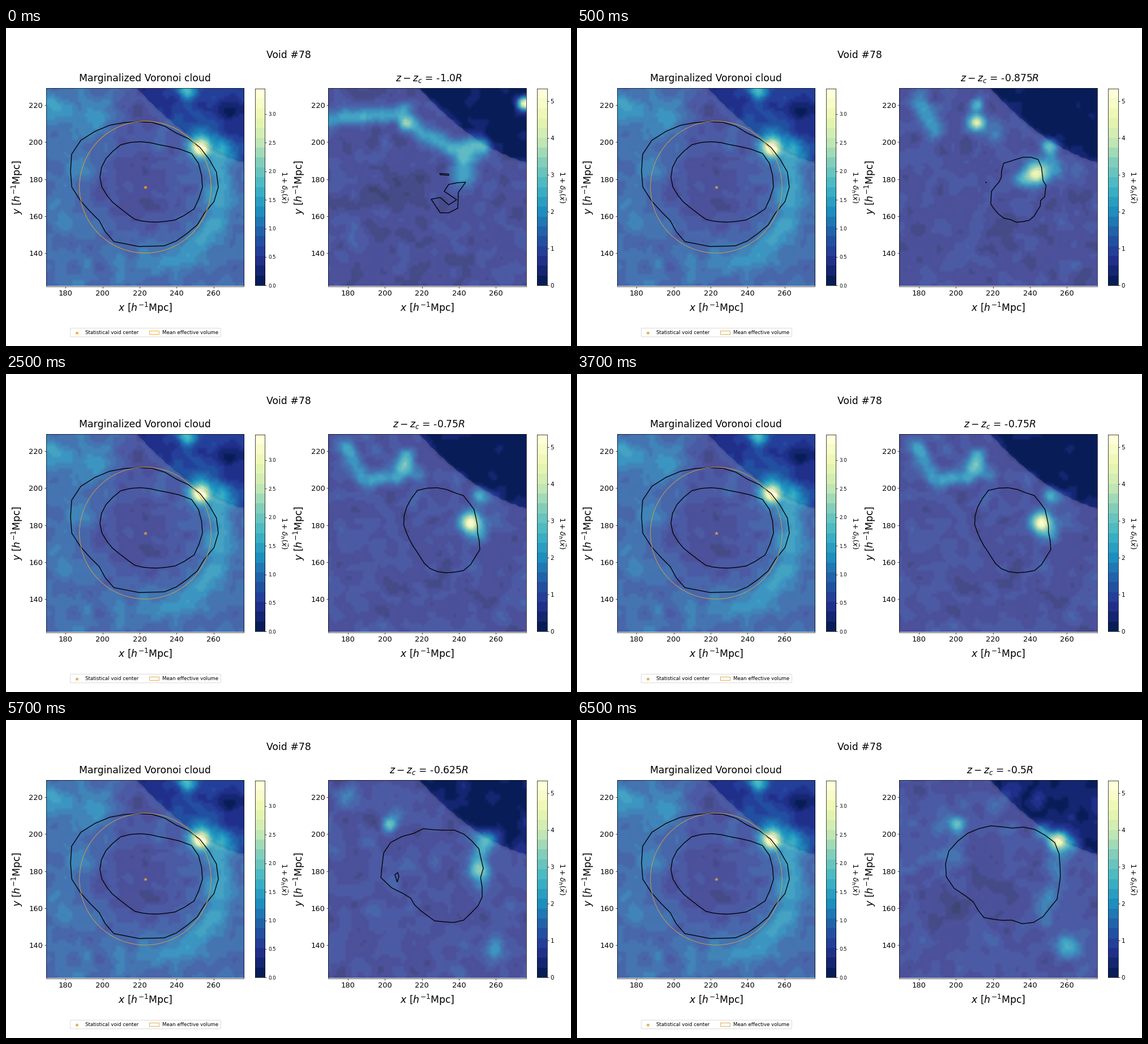
A matplotlib script for the animation above (8 s loop, 998 px wide and 561 px high).

```python
import numpy as np
import matplotlib.pyplot as plt
from matplotlib.animation import FuncAnimation
from matplotlib.patches import Circle, FancyBboxPatch, Polygon, Rectangle

W, H, DPI = 998, 561, 64          # all coordinates below are stage pixels
LEFT, TOP, SIZE, SHIFT = 71.0, 106.3, 349.2, 498.4
CENTER, RADIUS = (246, 280.7), 116.3
GRID = 68
CMAP = plt.get_cmap("YlGnBu_r", 20)
VEIL = np.array([0.84, 0.73, 0.80])
ORANGE, GOLD = "#fba414", "#d9a441"
plt.rcParams["font.family"] = "DejaVu Sans"

# Peaks are (x, y, height, spread); outlines are a center and radii every 30 degrees.
CLOUD_PEAKS = [(343, 213, .78, 12), (318, 111, .36, 11), (85, 145, .16, 18),
               (150, 150, .09, 25), (240, 150, -.13, 28), (385, 215, .18, 16),
               (412, 150, -.10, 25)]
CLOUD_OUTER = (CENTER, [129, 112, 110, 104, 110, 99, 130, 146, 125, 114, 109, 123])
CLOUD_INNER = (CENTER, [102, 91, 69, 62, 57, 60, 76, 86, 87, 77, 81, 105])

HOOK = [(782, 276), (797, 273), (812, 272), (799, 290), (798, 318), (782, 326), (767, 326),
        (751, 302), (767, 299), (782, 312), (796, 303), (774, 288)]

SLICES = [
    dict(depth="-1.0", base=.135, beyond=.03,
         ridge=[(575, 165), (600, 157), (695, 154), (735, 186), (785, 212), (840, 208)],
         crest=.30, width=11,
         peaks=[(706, 170, .26, 9), (706, 140, .14, 9), (807, 233, .36, 13),
                (836, 222, .16, 15), (806, 262, .30, 14), (915, 134, .90, 8),
                (690, 290, -.06, 40)],
         outline=None),
    dict(depth="-0.875", base=.135, beyond=.02,
         ridge=[(607, 125), (618, 155), (632, 185)], crest=.22, width=12,
         peaks=[(707, 169, .70, 10), (707, 137, .34, 8), (735, 190, .18, 14),
                (811, 259, .74, 14), (785, 270, .20, 10), (836, 210, .42, 10),
                (838, 240, .20, 13)],
         outline=((782, 288), [45, 41, 51, 55, 54, 56, 50, 38, 56, 57, 64, 47])),
    dict(depth="-0.75", base=.14, beyond=.02,
         ridge=[(604, 133), (632, 188), (690, 184), (708, 143)], crest=.27, width=10,
         peaks=[(709, 166, .25, 11), (730, 180, .15, 12), (820, 263, .78, 13),
                (836, 280, .18, 12), (838, 215, .32, 11)],
         outline=((770, 280), [64, 74, 76, 72, 62, 54, 62, 75, 87, 76, 74, 68])),
    dict(depth="-0.625", base=.145, beyond=.035,
         ridge=[(848, 214), (835, 240), (836, 295)], crest=.20, width=12,
         peaks=[(677, 186, .42, 9), (688, 168, .15, 11), (600, 135, .18, 14),
                (848, 214, .22, 13), (835, 264, .33, 13), (863, 405, .20, 13)],
         outline=((765, 278), [75, 84, 87, 78, 67, 61, 101, 108, 92, 84, 88, 85])),
    dict(depth="-0.5", base=.165, beyond=.06,
         ridge=[(850, 214), (850, 270), (836, 305), (822, 345)], crest=.14, width=12,
         peaks=[(672, 186, .40, 10), (661, 235, .13, 16), (849, 214, .60, 11),
                (825, 196, .22, 11), (872, 216, .24, 13), (868, 400, .24, 15),
                (745, 280, -.07, 50), (650, 340, -.09, 24)],
         outline=((760, 277), [92, 95, 93, 74, 81, 73, 108, 112, 98, 86, 97, 103]))]


def pt(px):
    return px * 72 / DPI


def survey_edge(u):
    """Height of the survey rim, u pixels right of where it meets the top."""
    return TOP + 1.107 * u - .00219 * u ** 2


def panel_grid(left):
    step = (np.arange(GRID) + .5) * SIZE / GRID
    return np.meshgrid(left + step, TOP + step)


def smooth_noise(seed, grain):
    freq = np.fft.fftfreq(GRID)
    kernel = np.exp(-2 * (np.pi * 1.5) ** 2 * (freq[:, None] ** 2 + freq ** 2))
    noise = np.random.default_rng(seed).normal(size=(GRID, GRID))
    noise = np.fft.ifft2(np.fft.fft2(noise) * kernel).real
    return noise * grain / noise.std()


def bump(distance, spread):
    return np.exp(-(distance / spread) ** 2 / 2)


def ridge_profile(x, y, points, width):
    t = np.linspace(0, len(points) - 1, 60)
    px, py = (np.interp(t, range(len(points)), axis) for axis in zip(*points))
    distance = np.hypot(x[..., None] - px, y[..., None] - py).min(axis=2)
    return bump(distance, width)


def void_profile(x, y):
    """Empty inside, with a wall that is densest toward the right."""
    dx, dy = x - CENTER[0], y - CENTER[1]
    r = np.hypot(dx, dy) / RADIUS
    wall = np.clip(dx / (r * RADIUS) + .3 * dy / (r * RADIUS), 0, 1)
    return .15 * wall * bump(r - 1.15, .13) - .125 * np.exp(-(r / .85) ** 4)


def density(x, y, left, base, beyond, peaks, seed, grain):
    depth = y - survey_edge(x - left - 161)
    inside = 1 / (1 + np.exp(-np.clip(depth / 3, -30, 30)))
    field = beyond + (base - beyond) * inside + smooth_noise(seed, grain)
    for px, py, height, spread in peaks:
        field += height * bump(np.hypot(x - px, y - py), spread)
    return field


def show_field(ax, x, y, field, left):
    """Plain field, with a veiled copy of it clipped to the survey region."""
    field = np.clip(field, 0, .999)
    color = CMAP(field)[..., :3]
    veiled = color + .27 * (1 - field[..., None]) * (VEIL - color)
    extent = (left, left + SIZE, TOP + SIZE, TOP)
    plain, veil = (ax.imshow(c, extent=extent, interpolation="bilinear", aspect="auto", zorder=z)
                   for z, c in enumerate((color, veiled)))
    u = np.linspace(-9, 200, 60)
    rim = np.column_stack([left + 161 + u, survey_edge(u) + .8 * np.sin(u * .4)])
    corners = [(left + SIZE + 9, TOP + SIZE), (left, TOP + SIZE), (left, TOP - 9)]
    veil.set_clip_path(Polygon(np.vstack([rim, corners]), transform=ax.transData))
    lines = [ax.plot(rim[:, 0] + k, rim[:, 1] - k, color="#1c2c60", lw=.5, alpha=.35, zorder=2)[0]
             for k in (-1.5, 0, 1.5)]
    rings = ax.contour(x, y, field, levels=[.55, .65, .75], colors="#506070",
                       linewidths=.4, alpha=.3, zorder=3)
    return [plain, veil, rings, *lines]


def outline(ax, points):
    return ax.add_patch(Polygon(points, fill=False, ec="black", lw=pt(1.35), zorder=5))


def ragged(center, radii, seed):
    """Closed ring through evenly spaced radii, roughened between them."""
    t = np.arange(0, 12, .4)
    r = np.interp(t, range(13), radii + radii[:1])
    r += np.random.default_rng(seed).uniform(-2, 2, t.size)
    angle = t * np.pi / 6
    return np.column_stack([center[0] + r * np.cos(angle), center[1] + r * np.sin(angle)])


def pixel_axes(x, y, w, h):
    return fig.add_axes([x / W, 1 - (y + h) / H, w / W, h / H])


def label(x, y, s, px, ha="center", va="center", **kw):
    return stage.text(x, y, s, fontsize=pt(px), ha=ha, va=va, **kw)


def style(ax, size):
    ax.tick_params(labelsize=pt(size), width=pt(.7), length=pt(3), pad=pt(3))
    for spine in ax.spines.values():
        spine.set_linewidth(pt(.7))
        spine.set_zorder(8)


def panel(left):
    ax = pixel_axes(left, TOP, SIZE, SIZE)
    style(ax, 13)
    ax.set_xticks(left + 34.4 + 65.36 * np.arange(5), range(180, 261, 20))
    ax.set_yticks(397.4 - 65.36 * np.arange(5), range(140, 221, 20))
    label(left + SIZE / 2, 493.5, r"$x$ [$h^{-1}$Mpc]", 17.3)
    label(left - 51, 280.5, r"$y$ [$h^{-1}$Mpc]", 17.3, rotation=90)
    return ax


def frame_panel(ax, left):
    ax.set_xlim(left, left + SIZE)
    ax.set_ylim(TOP + SIZE, TOP)


def colorbar(x, vmax, ticks, size, label_x):
    ax = pixel_axes(x, 107.4, 17.4, 347)
    ax.imshow(CMAP(np.arange(20))[:, None], extent=(0, 1, 0, vmax), origin="lower",
              aspect="auto", interpolation="nearest")
    ax.yaxis.tick_right()
    ax.set_xticks([])
    ax.set_yticks(ticks)
    style(ax, size)
    label(label_x, 281, r"$1+\delta_h(\vec{x})$", 13, rotation=270)


fig = plt.figure(figsize=(W / DPI, H / DPI), dpi=DPI, facecolor="white")
stage = pixel_axes(0, 0, W, H)
stage.set(xlim=(0, W), ylim=(H, 0))
stage.axis("off")

label(499, 53, "Void #78", 17.3, va="baseline")
label(245.6, 94, "Marginalized Voronoi cloud", 17.3, va="baseline")
title = label(746.9, 94, "", 17.3, va="baseline")

cloud, section = panel(LEFT), panel(LEFT + SHIFT)
x, y = panel_grid(LEFT)
cloud_field = density(x, y, LEFT, .265, .19, CLOUD_PEAKS, 7, .028) + void_profile(x, y)
show_field(cloud, x, y, cloud_field, LEFT)
outline(cloud, ragged(*CLOUD_OUTER, seed=1))
outline(cloud, ragged(*CLOUD_INNER, seed=2))
ring = cloud.add_patch(Circle(CENTER, RADIUS, fill=False, lw=pt(.87), zorder=6))
star, = cloud.plot(*[[c] for c in CENTER], "*", ms=pt(6), mew=pt(.6), zorder=6)
frame_panel(cloud, LEFT)

x, y = panel_grid(LEFT + SHIFT)
layers = []
for n, s in enumerate(SLICES):
    field = density(x, y, LEFT + SHIFT, s["base"], s["beyond"], s["peaks"], 20 + n, .028)
    field += s["crest"] * ridge_profile(x, y, s["ridge"], s["width"])
    layer = show_field(section, x, y, field, LEFT + SHIFT)
    if s["outline"]:
        layer.append(outline(section, ragged(*s["outline"], seed=n)))
    layers.append(layer)
layers[0] += [outline(section, HOOK),
              outline(section, [(766, 256.5), (782, 257.7), (782, 260), (767, 258.8)])]
layers[1] += section.plot([722], [272], "k.", ms=pt(2.6), zorder=5)
layers[3].append(outline(section, [(687, 273), (692, 269), (694, 276), (691, 286)]))
frame_panel(section, LEFT + SHIFT)

colorbar(440, 3.44, np.arange(0, 3.1, .5), 8.66, 490.5)
colorbar(938.2, 5.33, range(6), 10.4, 981.5)

stage.add_patch(FancyBboxPatch((114.6, 530.6), 263.6, 13, fc="white", ec="#d5d5d5",
                               boxstyle="round,pad=1.2,rounding_size=1.8", lw=pt(.85)))
key_star, = stage.plot([125], [537.5], "*", ms=pt(5.4), mew=pt(.6))
key_ring = stage.add_patch(Rectangle((253, 533.8), 17.2, 5.8, fill=False, lw=pt(.87)))
label(140.2, 539.6, "Statistical void center", 8.66, ha="left", va="baseline")
label(276.3, 539.6, "Mean effective volume", 8.66, ha="left", va="baseline")


def update(frame):
    current = (frame + 3) // 4     # the first slice shows for one tick, later ones for four
    for n, layer in enumerate(layers):
        for artist in layer:
            artist.set_visible(n == current)
    title.set_text(rf"$z-z_c$ = {SLICES[current]['depth']}$R$")
    accent = GOLD if current else ORANGE
    for marker in (star, key_star):
        marker.set_color(accent)
    for shape in (ring, key_ring):
        shape.set_edgecolor(accent)
    return []


anim = FuncAnimation(fig, update, frames=16, interval=500, repeat=True, repeat_delay=0, blit=False)
plt.show()
```
